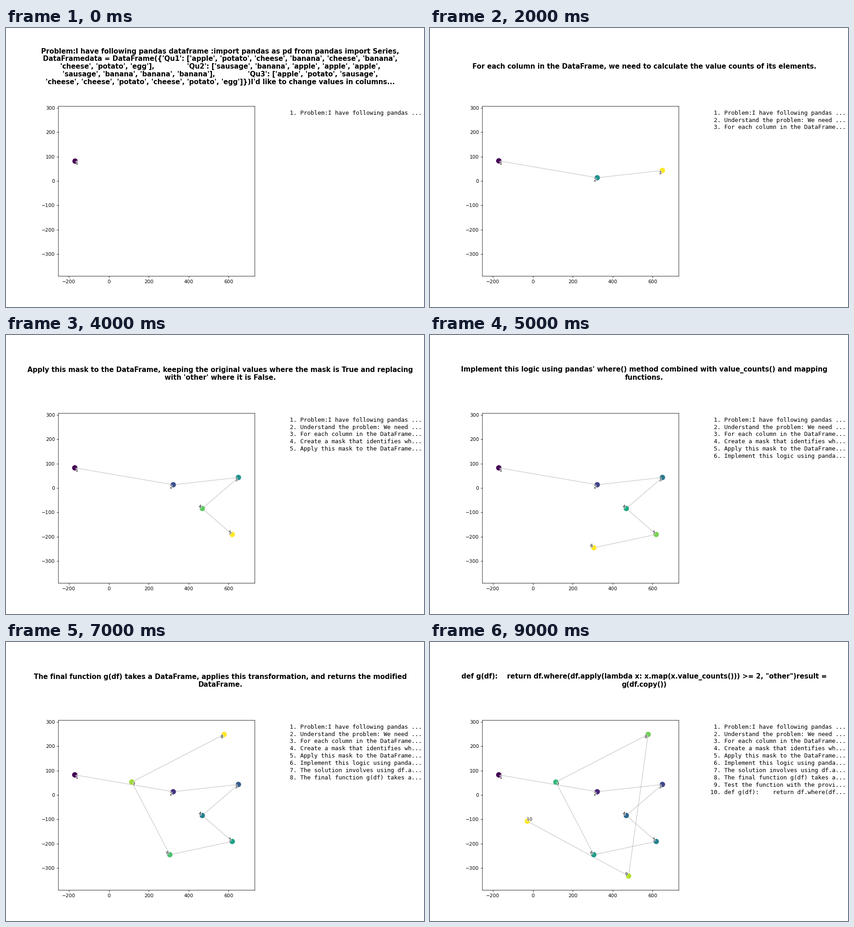
A matplotlib script that plays this animation: 917 by 611 pixels, repeating every 10000 ms.

```python
import numpy as np
import matplotlib.pyplot as plt
from matplotlib.animation import FuncAnimation
from matplotlib.patheffects import withStroke

W, H, DPI = 917, 611, 76.4

GAP = " " * 14
STEPS = [
    "Problem:I have following pandas dataframe :import pandas as pd from pandas import Series,\n"
    "DataFramedata = DataFrame({'Qu1': ['apple', 'potato', 'cheese', 'banana', 'cheese', 'banana',\n"
    f"'cheese', 'potato', 'egg'],{GAP}'Qu2': ['sausage', 'banana', 'apple', 'apple', 'apple',\n"
    f"'sausage', 'banana', 'banana', 'banana'],{GAP}'Qu3': ['apple', 'potato', 'sausage',\n"
    "'cheese', 'cheese', 'potato', 'cheese', 'potato', 'egg']})I'd like to change values in columns...",
    "Understand the problem: We need to replace values in each column of the DataFrame with 'other' if\n"
    "their count is less than 2. Values with count >= 2 should remain unchanged.",
    "For each column in the DataFrame, we need to calculate the value counts of its elements.",
    "Create a mask that identifies which values should be kept (count >= 2) and which should be replaced\n"
    "with 'other' (count < 2).",
    "Apply this mask to the DataFrame, keeping the original values where the mask is True and replacing\n"
    "with 'other' where it is False.",
    "Implement this logic using pandas' where() method combined with value_counts() and mapping\n"
    "functions.",
    "The solution involves using df.apply() to map each value to its count, then df.where() to replace\n"
    "values with 'other'.",
    "The final function g(df) takes a DataFrame, applies this transformation, and returns the modified\n"
    "DataFrame.",
    "Test the function with the provided DataFrame to verify it correctly replaces values with 'other' when\n"
    "their count is less than 2.",
    "def g(df):    return df.where(df.apply(lambda x: x.map(x.value_counts())) >= 2, \"other\")result =\n"
    "g(df.copy())",
]

POINTS = np.array([
    (-170.5, 82.8), (322.9, 13.5), (649.5, 43.4), (468.5, -84), (618.5, -190.6),
    (305.5, -245), (115.4, 53.2), (578, 248.7), (480, -332.5), (-27.5, -107.3),
])
# side of each dot its number sits on: (right = 1, above = 1)
SIDES = [(1, -1), (-1, -1), (-1, -1), (-1, 1), (-1, 1),
         (-1, 1), (1, -1), (-1, -1), (-1, 1), (1, 1)]

fig = plt.figure(figsize=((W + 0.01) / DPI, (H + 0.01) / DPI), dpi=DPI, facecolor="white")
ax = fig.add_axes([115 / W, 1 - 543.5 / H, 430.9 / W, 372.1 / H])
for spine in ax.spines.values():
    spine.set_snap(False)

title = fig.text(469.9 / W, 1 - 84.9 / H, "", fontsize=14, fontweight="bold",
                 ha="center", va="center", linespacing=1.16)
listing = fig.text(614.6 / W, 1 - 179.7 / H, "", fontsize=12, family="DejaVu Sans Mono",
                   ha="left", va="top", linespacing=1.289)


def list_line(i):
    return f"{i + 1:>2}. " + STEPS[i].replace("\n", " ")[:32] + "..."


def number(i):
    right, above = SIDES[i]
    dx, dy = 4.7 * right, (1.2 if above > 0 else -8)
    ax.annotate(str(i + 1), POINTS[i], xytext=(dx * 72 / DPI, dy * 72 / DPI),
                textcoords="offset points", fontsize=9, ha="center", va="baseline",
                path_effects=[withStroke(linewidth=2, foreground="white")])


def draw(step):
    n = step + 1
    ax.clear()
    x, y = POINTS[:n].T
    for i in range(step):
        ax.plot(x[i:i + 2], y[i:i + 2], color="gray", alpha=0.5, lw=1, zorder=0.9)
    ax.scatter(x, y, c=np.arange(n), cmap="viridis", s=100)
    for i in range(n):
        number(i)
    ax.set_xlim(-252.5, 731.8)
    ax.set_ylim(-390.6, 306.9)
    ax.set_xticks(range(-200, 601, 200))
    ax.set_yticks(range(-300, 301, 100))
    title.set_text(STEPS[step])
    listing.set_text("\n".join(list_line(i) for i in range(n)))
    return []


anim = FuncAnimation(fig, draw, frames=len(STEPS), init_func=lambda: draw(0),
                     interval=1000, repeat=True, repeat_delay=0)
plt.show()
```
